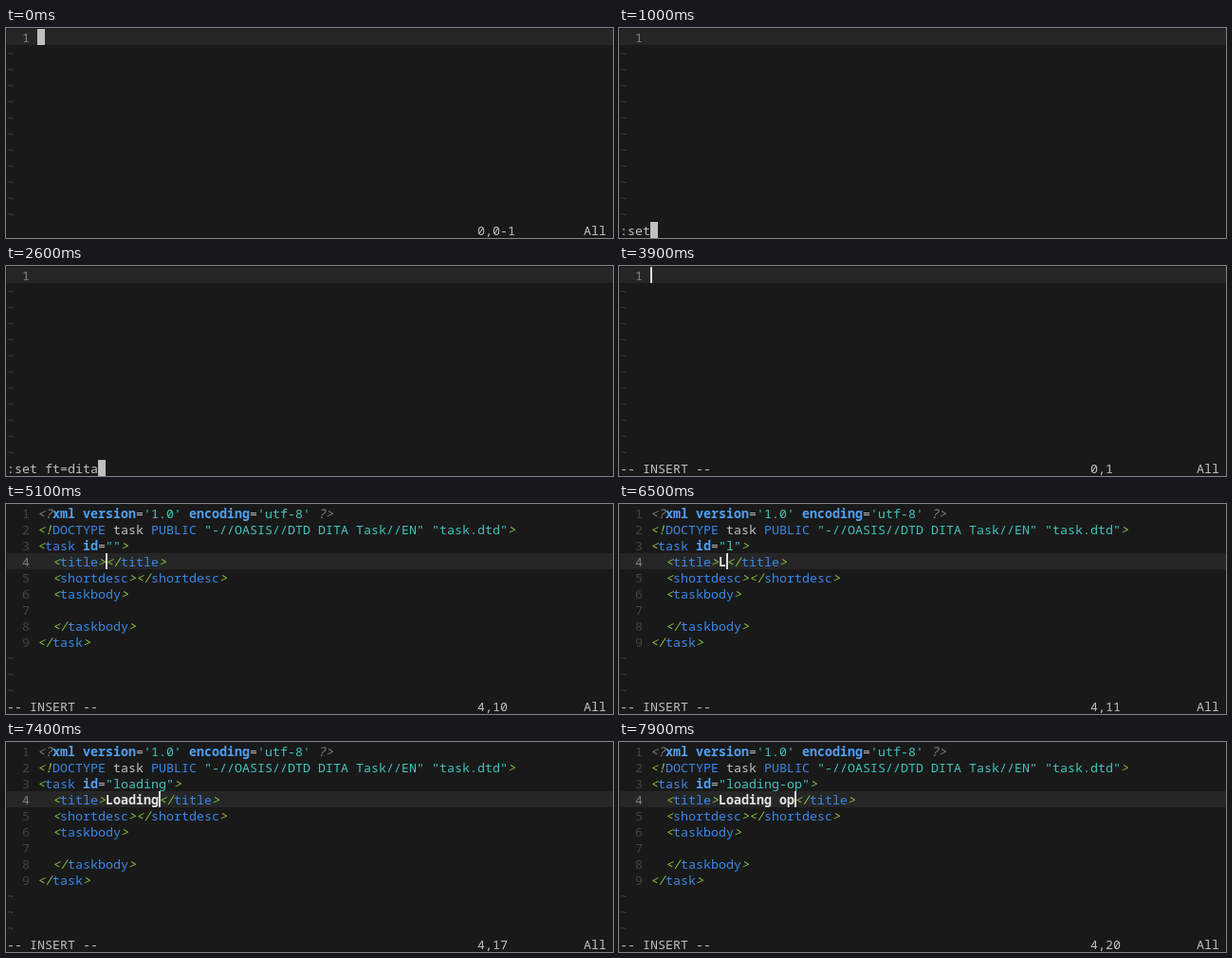
Recreate the animation shown at these times as an HTML page with a canvas. Size 640 px wide and 222 px high, loop 8000 ms.

```html
<!DOCTYPE html>
<html lang="en">
<head>
<meta charset="utf-8">
<title>Editor snippet demo</title>
<style>
html, body { margin: 0; height: 100%; overflow: hidden; background: #191919; }
canvas { display: block; }
</style>
</head>
<body>
<canvas id="stage" width="640" height="222"></canvas>
<script>
const ctx = document.getElementById('stage').getContext('2d');
const LOOP = 8000, CELL_W = 8, CELL_H = 17, GUTTER = 4, STATUS_ROW = 12;
const COMMAND = ':set ft=dita.xml', SNIPPET = 'task', TITLE = 'Loading op';

// Moments at which each character appears
const commandTimes = [300, 700, 800, 1000, 1100, 1300, 1500, 1800,
  2300, 2400, 2500, 2600, 2700, 2800, 3100, 3100];
const snippetTimes = [4200, 4300, 4500, 4600];
const titleTimes = [6500, 6700, 6800, 7100, 7200, 7300, 7400, 7500, 7700, 7900];
const idTimes = [6500, 6700, 6900, 7100, 7200, 7300, 7400, 7600, 7700, 7900];
const NORMAL_AGAIN = 3500, INSERT = 3900, EXPAND = 5100;

// style: [colour, font prefix]
const styles = {
  text: ['#c0c0c0', ''],
  dim: ['#444444', ''],
  number: ['#808080', ''],
  decl: ['#808080', 'italic '],
  attr: ['#4fa0f5', 'bold '],
  tag: ['#3a88e8', ''],
  mark: ['#87c540', 'italic '],
  string: ['#40c4bc', ''],
  title: ['#e4e4e4', 'bold ']
};

const typed = (text, times, t) => text.slice(0, times.filter(time => time <= t).length);
const cellX = col => 1 + col * CELL_W;
const cellY = row => 1 + row * CELL_H;

function fillBox(colour, x, y, w, h) {
  ctx.fillStyle = colour;
  ctx.fillRect(x, y, w, h);
}

// Writes alternating style names and strings from a cell onwards
function put(row, col, ...parts) {
  for (let i = 0; i < parts.length; i += 2) {
    const [colour, prefix] = styles[parts[i]];
    ctx.fillStyle = colour;
    ctx.font = prefix + '13.3333px "Noto Sans Mono", monospace';
    ctx.fillText(parts[i + 1], cellX(col), cellY(row) + 14);
    col += parts[i + 1].length;
  }
}

const code = (row, indent, ...parts) => put(row, GUTTER + indent, ...parts);
const openTag = name => ['mark', '<', 'tag', name, 'mark', '>'];
const closeTag = name => ['mark', '</', 'tag', name, 'mark', '>'];
const blockCursor = (row, col) => fillBox('#c0c0c0', cellX(col), cellY(row), CELL_W, CELL_H);
const barCursor = (row, col) => fillBox('#e0e0e0', cellX(col), cellY(row), 2, CELL_H);

function drawGutter(lines, current) {
  fillBox('#262626', 1, cellY(current), 639, CELL_H);
  for (let row = 0; row < STATUS_ROW; row++) {
    if (row < lines) put(row, 2, row === current ? 'number' : 'dim', String(row + 1));
    else put(row, 0, 'dim', '~');
  }
}

function drawStatus(message, ruler) {
  put(STATUS_ROW, 0, 'text', message);
  put(STATUS_ROW, 62, 'text', ruler);
  put(STATUS_ROW, 76, 'text', 'All');
}

function drawCommand(t) {
  const command = typed(COMMAND, commandTimes, t);
  drawGutter(1, 0);
  if (command && t < NORMAL_AGAIN) {
    put(STATUS_ROW, 0, 'text', command);
    blockCursor(STATUS_ROW, command.length);
  } else {
    drawStatus(command, '0,0-1');
    blockCursor(0, GUTTER);
  }
}

function drawSnippet(t) {
  const word = typed(SNIPPET, snippetTimes, t), n = word.length;
  drawGutter(1, 0);
  code(0, 0, 'text', word);
  barCursor(0, GUTTER + n);
  drawStatus('-- INSERT --', n ? `1,${n + 1}` : '0,1');
}

function drawDocument(t) {
  const title = typed(TITLE, titleTimes, t);
  const id = typed(TITLE, idTimes, t).toLowerCase().replace(' ', '-');
  drawGutter(9, 3);
  code(0, 0, 'decl', '<?', 'attr', 'xml version', 'text', '=', 'string', "'1.0' ",
    'attr', 'encoding', 'text', '=', 'string', "'utf-8'", 'decl', ' ?>');
  code(1, 0, 'mark', '<!', 'tag', 'DOCTYPE', 'text', ' task ', 'tag', 'PUBLIC ',
    'string', '"-//OASIS//DTD DITA Task//EN" "task.dtd"', 'mark', '>');
  code(2, 0, 'mark', '<', 'tag', 'task ', 'attr', 'id', 'text', '=',
    'string', `"${id}"`, 'mark', '>');
  code(3, 2, ...openTag('title'), 'title', title, ...closeTag('title'));
  code(4, 2, ...openTag('shortdesc'), ...closeTag('shortdesc'));
  code(5, 2, ...openTag('taskbody'));
  code(7, 2, ...closeTag('taskbody'));
  code(8, 0, ...closeTag('task'));
  barCursor(3, GUTTER + 9 + title.length);
  drawStatus('-- INSERT --', `4,${10 + title.length}`);
}

function draw(t) {
  fillBox('#191919', 0, 0, 640, 222);
  if (t < INSERT) drawCommand(t);
  else if (t < EXPAND) drawSnippet(t);
  else drawDocument(t);
}

const startTime = performance.now();
function tick() {
  draw((performance.now() - startTime) % LOOP);
  requestAnimationFrame(tick);
}
tick();
</script>
</body>
</html>
```
